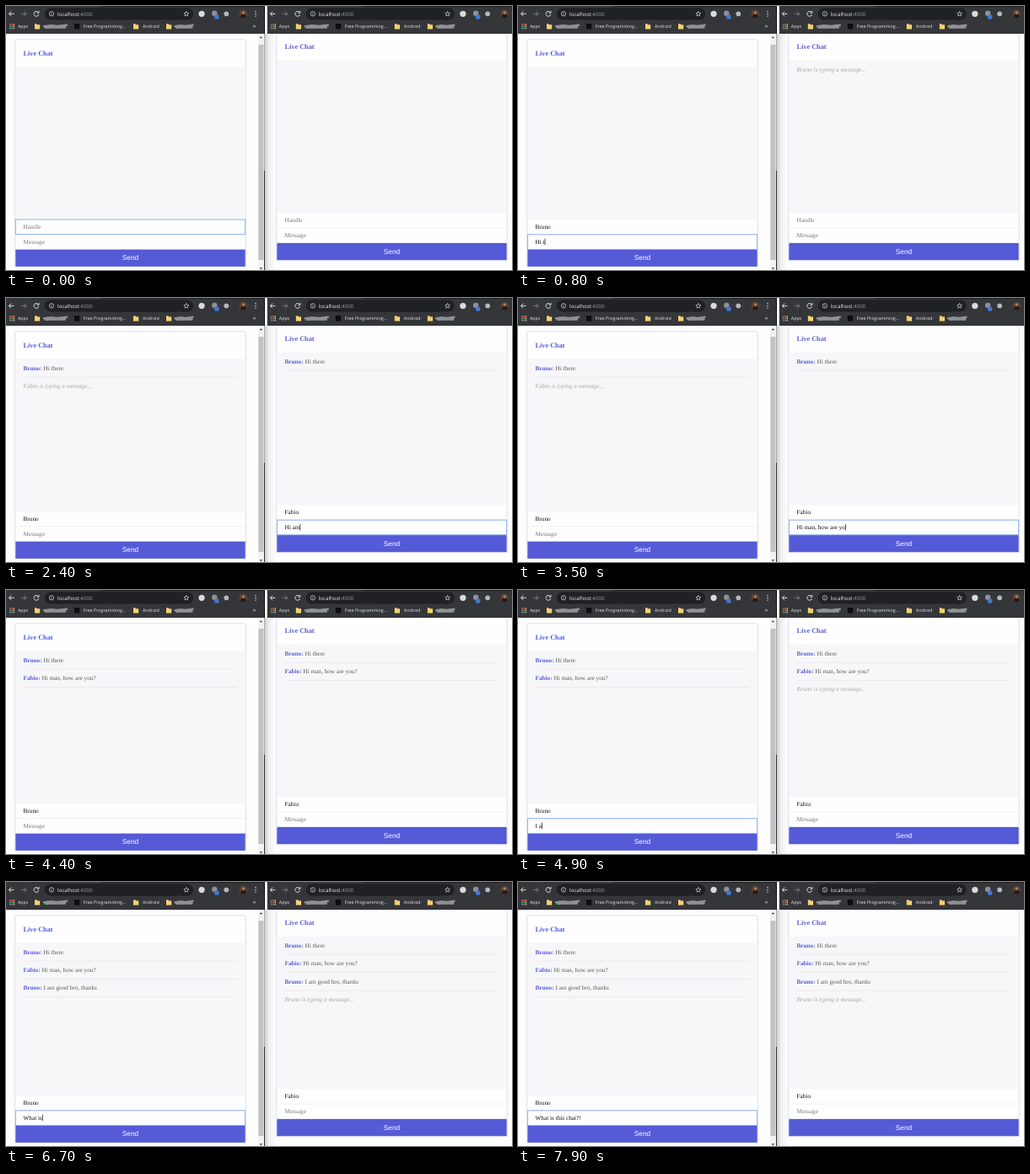
An HTML page that plays this animation: 600 px wide and 314 px high, repeating every 8 s.

```html
<!DOCTYPE html>
<html lang="en">
<head>
<meta charset="utf-8">
<title>Live Chat</title>
<style>
  html, body { margin: 0; width: 100%; height: 100%; overflow: hidden; background: #fefefe; }
  svg { display: block; width: 600px; height: 314px; }
  text { text-rendering: geometricPrecision; white-space: pre; }
  .ui { font: 5.3px "Open Sans", "Noto Sans", sans-serif; fill: #e4e5e7; }
  .url { font-size: 6.15px; fill: #f1f2f4; }
  .dim { fill: #9a9da2; }
  .chat { font: 7.25px "Liberation Serif", serif; fill: #5c5c5c; }
  .title { font-size: 8.25px; font-weight: bold; fill: #575ed8; }
  .name { font-weight: bold; fill: #575ed8; }
  .note { font-style: italic; fill: #a6a6a6; }
  .send { font: 8.3px "Liberation Sans", sans-serif; fill: #fff; }
  .icon { fill: none; stroke: #dcdee0; stroke-width: 1; }
</style>
</head>
<body>
<svg id="stage" viewBox="0 0 600 314">
  <defs>
    <linearGradient id="edge"><stop stop-color="#cfcfd2"/><stop offset=".35" stop-color="#eeeef0"/><stop offset="1" stop-color="#fefefe"/></linearGradient>
    <filter id="soft" x="-5%" y="-5%" width="110%" height="110%"><feGaussianBlur stdDeviation="1.1"/></filter>
  </defs>
</svg>
<script>
const LOOP = 8000, STEP = 100, ROW = 21.4;
const stage = document.getElementById('stage');
const people = ['Bruno', 'Fabio'];

// Typing: [start, end, text, characters already there]
const typing = [
  {
    handle: [[100, 500, 'Bruno', 0]],
    message: [
      [600, 1000, 'Hi there', 0], [1100, 1100, '', 0],
      [4700, 5700, 'I am good bro,', 0], [5700, 6100, 'I am good bro, thanks', 14], [6200, 6200, '', 0],
      [6300, 6700, 'What is', 0], [6700, 7390, 'What is this chat?!', 7]
    ]
  },
  {
    handle: [[1400, 1800, 'Fabio', 0]],
    message: [
      [2000, 2400, 'Hi am', 0], [2500, 2500, 'Hi a', 4], [2600, 2600, 'Hi ', 3],
      [2700, 3600, 'Hi man, how are you?', 3], [3900, 3900, '', 0]
    ]
  }
];
// Focus: [start, side, field]
const focus = [
  [-600, 0, 'handle'], [600, 0, 'message'], [1100], [1300, 1, 'handle'],
  [1900, 1, 'message'], [3900], [4700, 0, 'message'], [6200], [6300, 0, 'message']
];
// Sent: [time, sender, text]
const sent = [[1100, 0, 'Hi there'], [3900, 1, 'Hi man, how are you?'], [6200, 0, 'I am good bro, thanks']];
const fieldTop = { handle: 254, message: 271.8 };

const rect = (x, y, w, h, fill, extra = '') =>
  `<rect x="${x}" y="${y}" width="${w}" height="${h}" fill="${fill}" ${extra}/>`;
const dot = (x, y, r, fill) => `<circle cx="${x}" cy="${y}" r="${r}" fill="${fill}"/>`;
const label = (x, y, cls, text, extra = '') => `<text x="${x}" y="${y}" class="${cls}" ${extra}>${text}</text>`;
const line = (d, extra = '') => `<path class="icon" d="${d}" ${extra}/>`;

const folder = x =>
  `<path d="M${x - 3} 21.2h2.4l.8 1h3v5.2h-6.2z" fill="#f4d272"/>`;
const scribble = (x, w) =>
  `<path d="M${x} 24.3l${w * .3} -1 ${w * .3} .8 ${w * .4} -1.4M${x + 2} 25.6l${w * .4} -.4 ${w * .45} .2" fill="none" stroke="#909194" stroke-width="2.6" stroke-linecap="round" stroke-linejoin="round"/>`;

function star(cx, cy) {
  let d = '';
  for (let i = 0; i < 10; i++) {
    const a = i * Math.PI / 5 - Math.PI / 2, r = i % 2 ? 1.4 : 3.1;
    d += (i ? 'L' : 'M') + (cx + r * Math.cos(a)).toFixed(2) + ' ' + (cy + r * Math.sin(a)).toFixed(2);
  }
  return line(d + 'Z', 'style="stroke-width:.7"');
}

function appsGrid() {
  const colors = ['#e0594b', '#e0594b', '#e9b53c', '#56a866', '#5b8ee6', '#e9b53c', '#56a866', '#5b8ee6', '#e9b53c'];
  return colors.map((c, i) => rect(4 + i % 3 * 2.3, 21.2 + Math.floor(i / 3) * 2.3, 1.6, 1.6, c)).join('');
}

function toolbar(dx) {
  return `<g transform="translate(${dx})">` +
    rect(0, 0, 306, 33, '#35363a') + rect(113, 0, 193, 1, '#1d1e21') +
    line('M9.6 9.3H3.6M6.3 6.5L3.5 9.3l2.8 2.8') +
    line('M18 9.3h6M21.3 6.5l2.8 2.8-2.8 2.8', 'style="stroke:#7c7e82"') +
    line('M38.5 7.8a2.9 2.9 0 1 0 .3 2.3M39 5.9v2.3h-2.4') +
    rect(46, 2.2, 176, 14.4, '#202124', 'rx="7.2"') +
    `<circle class="icon" cx="54" cy="9.3" r="2.7" style="stroke-width:.7"/>` +
    line('M54 8.9v1.9M54 7.6v.7', 'style="stroke-width:.7"') +
    label(61, 11.6, 'ui url', 'localhost<tspan class="dim">:4000</tspan>') +
    star(213.8, 9.4) +
    dot(232, 9.3, 3.6, '#d9dadc') + dot(247.3, 8.7, 3.2, '#8e9196') +
    rect(247.2, 10.6, 5.2, 5, '#3f78dc', 'rx="1"') + dot(261.3, 9.3, 2.9, '#b4b7bb') +
    rect(276.5, 4.5, 10, 10, '#59402f', 'rx="5"') +
    `<path d="M278 13q0-3.4 3.5-3.4t3.5 3.4q-3.5 2.8-7 0z" fill="#241c1a"/>` + dot(281.5, 7.9, 1.9, '#a27756') +
    appsGrid() + label(14, 26.2, 'ui', 'Apps') +
    folder(37) + scribble(45, 27) +
    rect(81, 21, 6.4, 6.4, '#0d0d0f', 'rx="1"') + label(92, 26.2, 'ui', 'Free Programming...') +
    folder(154) + label(162, 26.2, 'ui', 'Android') +
    folder(193) + scribble(200.5, 21) + '</g>';
}

function card(side, dx, dy) {
  return `<g transform="translate(${dx} ${dy})">` +
    rect(10.8, 40, 273.4, 270, '#c9cbea', 'filter="url(#soft)"') +
    rect(11.3, 40.3, 272.4, 269.6, '#fefefe') +
    label(20.5, 59, 'chat title', 'Live Chat') +
    rect(11.3, 72.3, 272.4, 181.7, '#f7f7f9') +
    `<g id="log${side}"></g>` +
    rect(11.3, 271.4, 272.4, .7, '#ebebef') +
    rect(11.3, 289.6, 272.4, 20.3, '#555ad6') +
    label(147.5, 302.3, 'send', 'Send', 'text-anchor="middle"') +
    `<rect id="ring${side}" x="11.4" width="272.2" height="17.6" fill="none" stroke="#8fb2ee"/>` +
    `<text id="handle${side}" x="20.5" y="265.2" class="chat"></text>` +
    `<text id="message${side}" x="20.5" y="283" class="chat"></text>` +
    `<rect id="caret${side}" width=".7" height="7.6" fill="#111"/></g>`;
}

stage.insertAdjacentHTML('beforeend',
  rect(0, 0, 600, 314, '#fefefe') + card(0, 0, 0) +
  rect(307, 33, 13, 281, 'url(#edge)') + card(1, 310, -7.7) +
  rect(299, 33, 7, 281, '#f1f1f2') + rect(299.4, 46, 6, 256, '#c1c1c3') +
  '<path d="M300.5 38.3l1.9-2.2 1.9 2.2zM300.5 311.3l1.9 2.2 1.9-2.2z" fill="#505050"/>' +
  rect(306, 33, 1, 163, '#a9a9ac') + rect(306, 196, 1, 118, '#333438') +
  toolbar(0) + toolbar(309.8) + rect(306, 0, 1, 33, '#111214') +
  [6.6, 9.3, 12].map(y => dot(296, y, .75, '#dcdee0')).join('') +
  label(292.8, 26, 'ui', '»', 'style="font-size:7px"'));

const get = id => document.getElementById(id);
const latest = (list, t) => list.filter(s => s[0] <= t).pop();

function typed(list, t) {
  const step = latest(list, t);
  if (!step) return { text: '', last: -1e4 };
  const [start, end, text, kept] = step;
  const p = end > start ? Math.min(1, (t - start) / (end - start)) : 1;
  return { text: text.slice(0, kept + Math.round((text.length - kept) * p)), last: Math.min(t, end) };
}

function messages(side, t, note) {
  const shown = sent.filter(m => m[0] <= t);
  let out = shown.map(([, who, text], i) =>
    label(20.5, 85.5 + i * ROW, 'chat', `<tspan class="name">${people[who]}:</tspan> ${text}`) +
    rect(20.5, 93.7 + i * ROW, 253.5, .7, '#e7e7ec')).join('');
  if (note) out += label(20.5, 85.3 + shown.length * ROW, 'chat note', `${people[1 - side]} is typing a message...`);
  return out;
}

function setField(name, side, value) {
  const el = get(name + side);
  el.textContent = value || (name === 'handle' ? 'Handle' : 'Message');
  el.style.fill = value ? '#111' : '#7b7b7b';
  return value ? el.getComputedTextLength() : 0;
}

function draw(t) {
  const [since, active, field] = latest(focus, t);
  for (const side of [0, 1]) {
    const other = typed(typing[1 - side].message, t).text;
    get('log' + side).innerHTML = messages(side, t, other);
    const ring = get('ring' + side), caret = get('caret' + side);
    const on = active === side;
    ring.style.display = on ? '' : 'none';
    caret.style.display = 'none';
    for (const name of ['handle', 'message']) {
      const { text, last } = typed(typing[side][name], t);
      const width = setField(name, side, text);
      if (!on || name !== field) continue;
      ring.setAttribute('y', fieldTop[name]);
      caret.setAttribute('x', 20.6 + width);
      caret.setAttribute('y', fieldTop[name] + 4.8);
      if ((t - Math.max(since, last)) % 1000 < 500) caret.style.display = '';
    }
  }
}

let shown = -1;
function tick() {
  const t = Math.floor(performance.now() % LOOP / STEP) * STEP;
  if (t !== shown) draw(shown = t);
  requestAnimationFrame(tick);
}
tick();
</script>
</body>
</html>
```
